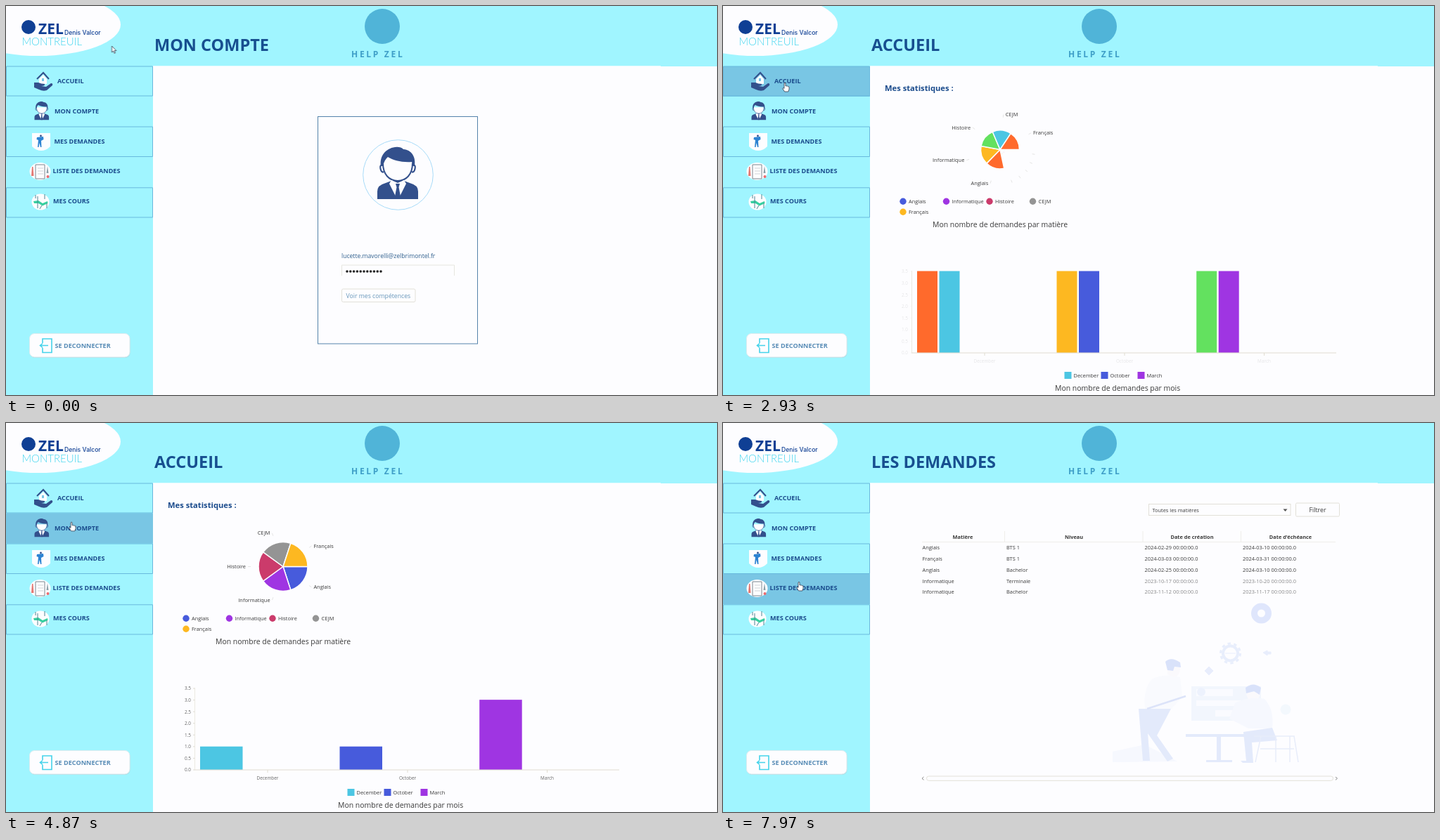
An HTML page that plays this animation: 1011x554 px, repeating every 8 s.

```html
<!DOCTYPE html>
<html lang="fr">
<head>
<meta charset="utf-8">
<title>Mon compte</title>
<style>
html, body { margin: 0; width: 100%; height: 100%; overflow: hidden; background: #fdfdff; }
svg { display: block; width: 1011px; height: 554px; }
text { font-family: "Open Sans", "Noto Sans", sans-serif; font-size: 7.4px; fill: #3a3a3a; white-space: pre; }
.b { font-weight: 700; }
.navy { fill: #1a4b8c; }
.title { font-size: 23.5px; font-weight: 700; fill: #174f90; }
.menu { font-size: 9.1px; font-weight: 700; }
.mid { text-anchor: middle; }
.end { text-anchor: end; }
.cap { font-size: 10.45px; }
.axis { font-size: 6.4px; fill: #666; }
.box { fill: #fdfdff; stroke: #e2e0d8; }

#account, #home, #mine, #list, #hover, #hand, #arrow { animation: account 8s step-end infinite; }
#home { animation-name: home; }
#mine { animation-name: mine; }
#list { animation-name: list; }
#hover { animation-name: hover; }
#hand { animation-name: hand; }
#arrow { animation-name: arrow; }
#cursor { animation: cursor 8s linear infinite; }

@keyframes account { 0% { opacity: 1 } 34.625%, 100% { opacity: 0 } }
@keyframes home { 0% { opacity: 0 } 34.625% { opacity: 1 } 64.125%, 100% { opacity: 0 } }
@keyframes mine { 0% { opacity: 0 } 64.125% { opacity: 1 } 91.6%, 100% { opacity: 0 } }
@keyframes list { 0% { opacity: 0 } 91.6%, 100% { opacity: 1 } }
@keyframes hover {
  0%, 6.05% { transform: translateY(-200px) }
  1.05%, 27% { transform: translateY(0) }
  2.04%, 25.06%, 55.875% { transform: translateY(42.5px) }
  3.05%, 23.14%, 61.4% { transform: translateY(86px) }
  4.05%, 21.2%, 87%, 100% { transform: translateY(129px) }
  5.06%, 19.31% { transform: translateY(172.5px) }
}
@keyframes hand {
  0%, 6.05%, 11.2% { opacity: 0 }
  1.05%, 9.89%, 19.31%, 100% { opacity: 1 }
}
@keyframes arrow {
  0%, 6.05%, 11.2% { opacity: 1 }
  1.05%, 9.89%, 19.31%, 100% { opacity: 0 }
}
@keyframes cursor {
  0%, .375% { transform: translate(150.5px, 57px) }
  10.375%, 10.875% { transform: translate(118px, 487px) }
  13.375%, 18.75% { transform: translate(119px, 328px) }
  19.125% { transform: translate(117px, 305.5px) }
  27.875%, 55.87% { transform: translate(88px, 109px) }
  55.875%, 60.875% { transform: translate(93px, 140px) }
  61.875%, 86.25% { transform: translate(97px, 200.5px) }
  87.5%, 100% { transform: translate(108px, 226px) }
}
</style>
</head>
<body>
<svg viewBox="0 0 1011 554" xmlns="http://www.w3.org/2000/svg">
  <defs>
    <g id="man" fill="#33508c">
      <path d="M8 23C8 39 17 48 29 48S50 39 50 23" fill="#fdfdff" stroke="#33508c" stroke-width="2"/>
      <path d="M5 27C3 12 12 2 25 0Q33-1 37 3C49 4 55 14 53 27L50 27 49 21C35 22 23 19 15 14Q10 18 8 27Z"/>
      <path d="M8 25Q3 25 4.500 31T9 35M50 25Q55 25 53.500 31T49 35" fill="none" stroke="#33508c" stroke-width="2.2"/>
      <path d="M0 74V63Q0 54 12 51L20 48H38L46 51Q58 54 58 63V74Z"/>
      <path d="M20 47L17 52 28 74H30L41 52 38 47 29 51Z" fill="#fdfdff"/>
      <path d="M26 52H32L30.5 57 33 70 32 74H26L25 70 27.5 57Z"/>
    </g>
    <g id="scene">
      <circle cx="765.5" cy="271" r="10" fill="none" stroke="#dfe6fc" stroke-width="9"/>
      <g opacity=".72">
        <circle cx="721.5" cy="328" r="10.5" fill="none" stroke="#e0e8fb" stroke-width="4"/>
        <circle cx="721.5" cy="328" r="14" fill="none" stroke="#e0e8fb" stroke-width="3" stroke-dasharray="4.4 4.4"/>
        <path d="M714 328H729M685 353L691 347 697 353 691 359ZM768 327L774 324V326H779V329H774V331Z" fill="#dfe7fb" stroke="#dfe7fb"/>
        <path d="M554 483V468L600 458 646 482Z" fill="#f3f6fe"/>
        <path d="M666 375H765V424H666Z" fill="#edf3fd"/>
        <path d="M673 379H725V389H673ZM673 395H757V403H673ZM700 409H757V418H700Z" fill="#f8faff"/>
        <circle cx="680" cy="383" r="6" fill="#e6eefc"/>
        <path d="M611 364Q630 356 650 362L653 390 638 407H600Q597 377 611 364Z" fill="#f7f9fe"/>
        <path d="M632 351L642 347 650 348Q650 361 641 362L632 358Z" fill="#f9f7fb"/>
        <path d="M629 340Q637 332 650 341L651 348 642 347 640 353 632 352Z" fill="#cbd7f9"/>
        <path d="M591 407H637L617 445 640 478 632 482 604 442 607 481H597Z" fill="#d9e2fa"/>
        <path d="M603 407L658 389" stroke="#cfd9f7" stroke-width="2.4"/>
        <path d="M658 443H762V447H708V480H724V483H687V480H702V447H658Z" fill="#d9e2fa"/>
        <path d="M744 383L764 383Q763 396 754 396T744 383Z" fill="#f9f7fb"/>
        <path d="M743 377Q754 368 765 377L763 387 755 382 744 385Z" fill="#cbd7f9"/>
        <path d="M728 399Q748 389 770 393 784 408 781 435H747L720 421Z" fill="#f3f6fe"/>
        <circle cx="800" cy="408" r="7.5" fill="#eff6fd"/>
        <path d="M781 434L740 440 744 481H736L739 484H754L752 455 788 452Z" fill="#d9e2fa"/>
        <path d="M755 446H812L818 483M765 446L757 483M806 446V483M786 447V483M764 464H812" fill="none" stroke="#dfe6f8" stroke-width="1.5"/>
      </g>
    </g>
  </defs>

  <rect width="1011" height="554" fill="#fdfdff"/>
  <path d="M0 0H1011V86H931V85.3H209V554H0Z" fill="#a0f5ff"/>
  <ellipse cx="46" cy="26.500" rx="117" ry="44.500" fill="#fdfdff"/>
  <circle cx="32" cy="30" r="10" fill="#0f3f94"/>
  <text x="46" y="40" class="b" style="font-size:21px;fill:#0f3f94">ZEL</text>
  <text x="83" y="40.5" style="font:500 8.6px Inter,sans-serif;fill:#0f3f94">Denis Valcor</text>
  <text x="22.5" y="56" style="font:300 15px Lato,sans-serif;fill:#41d5ef">MONTREUIL</text>
  <circle cx="535" cy="29" r="25" fill="#50b4d8"/>
  <text x="491" y="73" style="font-size:12px;font-weight:700;letter-spacing:2.7px;fill:#3f9fc8">HELP ZEL</text>

  <rect id="hover" y="86" width="209" height="43" fill="#79c6e4"/>
  <path d="M.5 86H208.5V128H.5ZM.5 172H208.5V214.5H.5ZM.5 258.8H208.5V301H.5Z" fill="none" stroke="#68b9dd"/>

  <g fill="#33508c">
    <path d="M44 104L53 95 61 104" fill="none" stroke="#33508c" stroke-width="2"/>
    <path d="M47 104L53 98 58 104V111H47Z" fill="#fdfdff"/>
    <path d="M51 103H54V107H51Z" fill="#79c6e4"/>
    <path d="M40 109H46Q50 111 55 111 56 114 50 114L57 115 64 110Q67 110 66 113L58 120Q53 122 47 119L40 116Z"/>
    <use href="#man" transform="translate(40.5 136) scale(.355)"/>
    <path d="M37 181H63V200Q57 206 50 206T37 200Z" fill="#fdfdff"/>
    <circle cx="49.5" cy="185" r="1.4"/>
    <path d="M44 187L53 186 53.500 190 50 192 50.500 201H49L47.500 195 46.500 201H45L46 191 43.500 190Z" fill="#2d83d2"/>
    <ellipse cx="48.500" cy="235.500" rx="15" ry="12.500" fill="#fdfdff"/>
    <path d="M42 226H55V246H42Z" fill="#fdfdff" stroke="#7d868e"/>
    <path d="M45 231H53M45 235H53M45 239H53" stroke="#c6cbcf" stroke-width=".8"/>
    <path d="M37 229H38.500L39.500 242H36Z" fill="#e37973"/>
    <path d="M57.500 238L59 228 60.500 238Z" fill="#8aa0a8"/>
    <circle cx="59.5" cy="243" r="2" fill="#ef6b6f"/>
    <ellipse cx="49" cy="279" rx="12.5" ry="11.5" fill="#fdfdff"/>
    <path d="M39 278L46 277 52 281 59 278 59.500 281 52 284.500 46 281 40 281Z" fill="#37cfa0"/>
    <path d="M42 269V274M45 271V288M55 268V275M58 281V288M51 284L48 289" stroke="#4f8592"/>
  </g>
  <g id="menu"></g>

  <rect x="34" y="467.500" width="142.5" height="33.5" rx="7" fill="#a9d9e2"/>
  <rect x="33.5" y="466.5" width="142.5" height="33.5" rx="7" fill="#fdfdff" stroke="#dcecf0"/>
  <path d="M52 480V474H65V493.5H52V487M48.5 483.5H60M52 480.5L48.5 483.5 52 486.5" fill="none" stroke="#45d3ea" stroke-width="1.6"/>
  <text x="69.5" y="487" class="menu" style="fill:#588cb6">SE DECONNECTER</text>

  <g id="account">
    <text x="211" y="64" class="title">MON COMPTE</text>
    <rect x="443.5" y="157.5" width="227" height="323.5" fill="none" stroke="#5583ab"/>
    <circle cx="557.5" cy="240.5" r="49.8" fill="none" stroke="#a6daf8"/>
    <use href="#man" x="528" y="201"/>
    <text x="477" y="359" style="font-size:8.6px;fill:#2f5f8d">lucette.mavorelli@zelbrimontel.fr</text>
    <path d="M477.5 384V369H637.5V384" fill="none" stroke="#e6e6df"/>
    <path d="M485 378H535" stroke="#222" stroke-width="3.6" stroke-linecap="round" stroke-dasharray="0 4.8"/>
    <rect x="477.5" y="403" width="104.5" height="18.5" rx="2" class="box"/>
    <text x="483.5" y="415.5" style="font-size:8.7px;fill:#6796ba">Voir mes compétences</text>
  </g>

  <g id="home">
    <text x="211" y="64" class="title">ACCUEIL</text>
    <text x="230" y="121" class="b navy" style="font-size:11.2px">Mes statistiques :</text>
    <g id="pie"></g>
    <g id="subjects"></g>
    <text x="298" y="314.5" class="cap">Mon nombre de demandes par matière</text>
    <path d="M268.5 377V494" stroke="#eceae2"/>
    <g id="bars"></g>
    <path d="M268 494H872M372 494V498M571 494V498M769.5 494V498" stroke="#e0dcd0"/>
    <g id="ticks"></g>
    <g id="months"></g>
    <text x="472" y="548" class="cap">Mon nombre de demandes par mois</text>
  </g>
  <g id="mine"></g>
  <g id="list"></g>

  <g id="cursor" stroke="#30384a" stroke-width=".8" fill="#fff" stroke-linejoin="round">
    <path id="arrow" d="M0 0V9L2.1 7.2 3.6 10.4 5 9.8 3.6 6.6H6.4Z"/>
    <path id="hand" d="M-1 1Q0-.6 1 1V5Q2 4 2.8 5.2 4 4.5 4.6 5.7 6 5.2 6 6.8V9.5L4.8 13H-.4L-3.3 8.6Q-3.3 7-1 8.3Z"/>
  </g>
</svg>
<script>
const $ = id => document.getElementById(id);
const text = (x, y, s, cls = '') => `<text x="${x}" y="${y}" class="${cls}">${s}</text>`;

$('menu').innerHTML = [
  [73, 110, 'ACCUEIL'], [69, 153, 'MON COMPTE'], [68.5, 196.3, 'MES DEMANDES'],
  [66.5, 238.3, 'LISTE DES DEMANDES'], [67, 281.3, 'MES COURS']
].map(m => text(...m, 'menu navy')).join('');

// Tables
const ROW = 15.85;
const date = d => d + ' 00:00:00.0';

function table(title, cols, rows) {
  const head = cols.map(c => text(c.mid, 164.5, c.name, 'b mid')).join('');
  const lines = cols.slice(1).map(c => `M${c.x - 2.5} 154V169.5`).join('');
  const cells = rows.map((row, r) => row.map((s, c) =>
    `<g opacity="${r > 2 && c > 1 ? .6 : 1}">${text(cols[c].x, 180 + r * ROW, s)}</g>`).join('')).join('');
  return text(211, 64, title, 'title') +
    '<use href="#scene"/>' +
    '<rect x="605.5" y="115.5" width="201.5" height="16" class="box"/>' +
    text(610.5, 126.5, 'Toutes les matières') +
    '<path d="M796.5 122.5H802.5L799.5 126Z" fill="#555"/>' +
    '<rect x="814.5" y="114" width="62" height="19" rx="1.5" class="box"/>' +
    '<text x="845.5" y="127" class="mid" style="font-size:8.8px">Filtrer</text>' +
    `<path d="${lines}M283 169.5H871" stroke="#efeeea"/>` + head + cells +
    '<rect x="289.5" y="503" width="578" height="6.3" rx="3" class="box"/>' +
    '<path d="M285.5 504L283 506.2 285.5 508.4M871 504L873.5 506.2 871 508.4" fill="none" stroke="#888"/>';
}

const col = (name, x, mid) => ({ name, x, mid });
$('mine').innerHTML = table('MES DEMANDES', [
  col('Matière', 283.5, 341), col('Niveau', 403, 466.5), col('Date de création', 534.5, 597),
  col("Date d'échéance", 663.5, 726), col('Statut', 793, 833)
], [
  ['Anglais', '2024-03-03', '2025-01-05'], ['CEJM', '2024-03-03', '2024-03-10'],
  ['Français', '2023-12-30', '2024-01-05'], ['Informatique', '2023-10-15', '2023-10-20'],
  ['Histoire', '2024-03-03', '2024-03-30']
].map(([s, a, b]) => [s, 'Master 2', date(a), date(b), 'En attente'])) +
  '<rect x="527" y="517.5" width="131" height="25" rx="2" class="box"/>' +
  '<text x="592.5" y="533.5" class="b navy mid" style="font-size:10.2px">CREER</text>';

$('list').innerHTML = table('LES DEMANDES', [
  col('Matière', 283.5, 341), col('Niveau', 403, 499),
  col('Date de création', 599.5, 667), col("Date d'échéance", 739, 807)
], [
  ['Anglais', 'BTS 1', '2024-02-29', '2024-03-10'], ['Français', 'BTS 1', '2024-03-03', '2024-03-31'],
  ['Anglais', 'Bachelor', '2024-02-25', '2024-03-10'], ['Informatique', 'Terminale', '2023-10-17', '2023-10-20'],
  ['Informatique', 'Bachelor', '2023-11-12', '2023-11-17']
].map(([s, n, a, b]) => [s, n, date(a), date(b)]));

// Charts
const ORANGE = '#ff6a2c', YELLOW = '#fdb821', GREEN = '#63e15f', CYAN = '#4cc6e3',
  BLUE = '#475bdc', PURPLE = '#9f35e2', RED = '#cb3b6b', GRAY = '#949494';
const SUBJECTS = ['Anglais', 'Informatique', 'Histoire', 'CEJM', 'Français'];
const FRESH = [BLUE, PURPLE, RED, GRAY, YELLOW];
const STALE = [ORANGE, YELLOW, GREEN, CYAN, ORANGE];
const MONTHS = [
  { name: 'December', n: 1, fresh: CYAN, stale: ORANGE, x: 276, tick: 372 },
  { name: 'October', n: 1, fresh: BLUE, stale: YELLOW, x: 474.5, tick: 571 },
  { name: 'March', n: 3, fresh: PURPLE, stale: GREEN, x: 673.2, tick: 769.5 }
];

$('subjects').innerHTML = SUBJECTS.map((s, i) => {
  const x = 256 + i % 4 * 61.5, y = i < 4 ? 278.3 : 293.3;
  return `<circle cx="${x}" cy="${y}" r="4.7" fill="${FRESH[i]}"/>` + text(x + 8, y + 2.6, s);
}).join('');
$('months').innerHTML = MONTHS.map((m, i) =>
  `<rect x="${485.5 + i * 52}" y="521" width="10" height="10" fill="${m.fresh}"/>` +
  text(498.5 + i * 52, 529, m.name)).join('');
$('ticks').innerHTML = Array.from({ length: 8 }, (_, i) => {
  const y = 494 - i * 16.57;
  return text(263, y + 2.4, (i / 2).toFixed(1), 'axis end') +
    `<path d="M266 ${y}H268.5" stroke="#dedbd2"/>`;
}).join('') + MONTHS.map(m => text(m.tick, 508, m.name, 'axis mid')).join('');

const CX = 394, CY = 204.5, R = 35, LABEL = 50;
const at = (a, r) => [CX + r * Math.cos(a), CY + r * Math.sin(a)];
const pt = (a, r) => at(a, r).map(v => v.toFixed(2)).join(' ');
const unit = v => Math.max(0, Math.min(1, v));

function slices(from, weight, colors, labelAlpha) {
  if (weight <= 0) return '';
  const step = weight * Math.PI * 2 / 5, r = R * weight;
  return SUBJECTS.map((s, i) => {
    const a = from + i * step, mid = a + step / 2;
    const [x, y] = at(mid, LABEL), left = Math.cos(mid) < 0;
    return `<path d="M${CX} ${CY}L${pt(a, r)}A${r} ${r} 0 0 1 ${pt(a + step, r)}Z" fill="${colors[i]}" stroke="#fdfdff" stroke-width="1.5"/>` +
      `<path d="M${pt(mid, LABEL - 4)}L${pt(mid, LABEL)}" stroke="#e4e4e4"/>` +
      `<g opacity="${labelAlpha}">${text(x + (left ? -3 : 3), y + 2.5, s, left ? 'end' : '')}</g>`;
  }).join('');
}

function drawPie(t) {
  const u = unit((t - 2770) / 740), fade = unit((t - 3510) / 190);
  $('pie').innerHTML = slices(0, u, FRESH, fade) + slices(u * Math.PI * 2, 1 - u, STALE, 1);
}

function drawBars(t) {
  const top = 1 + 2.5 * unit((t - 3235) / 335), merged = t >= 3570;
  $('bars').innerHTML = MONTHS.map(m => {
    const h = 116.5 * Math.min(1, m.n / top);
    const bar = (x, w, fill) => `<rect x="${x}" y="${494 - h}" width="${w}" height="${h}" fill="${fill}"/>`;
    return merged ? bar(m.x, 60.5, m.fresh) : bar(m.x, 29, m.stale) + bar(m.x + 31.5, 29, m.fresh);
  }).join('');
  $('ticks').setAttribute('opacity', .15 + .85 * unit((t - 3300) / 400));
}

let start;
function frame(now) {
  start ??= now;
  const t = (now - start) % 8000;
  drawPie(t);
  drawBars(t);
  requestAnimationFrame(frame);
}
requestAnimationFrame(frame);
</script>
</body>
</html>
```
